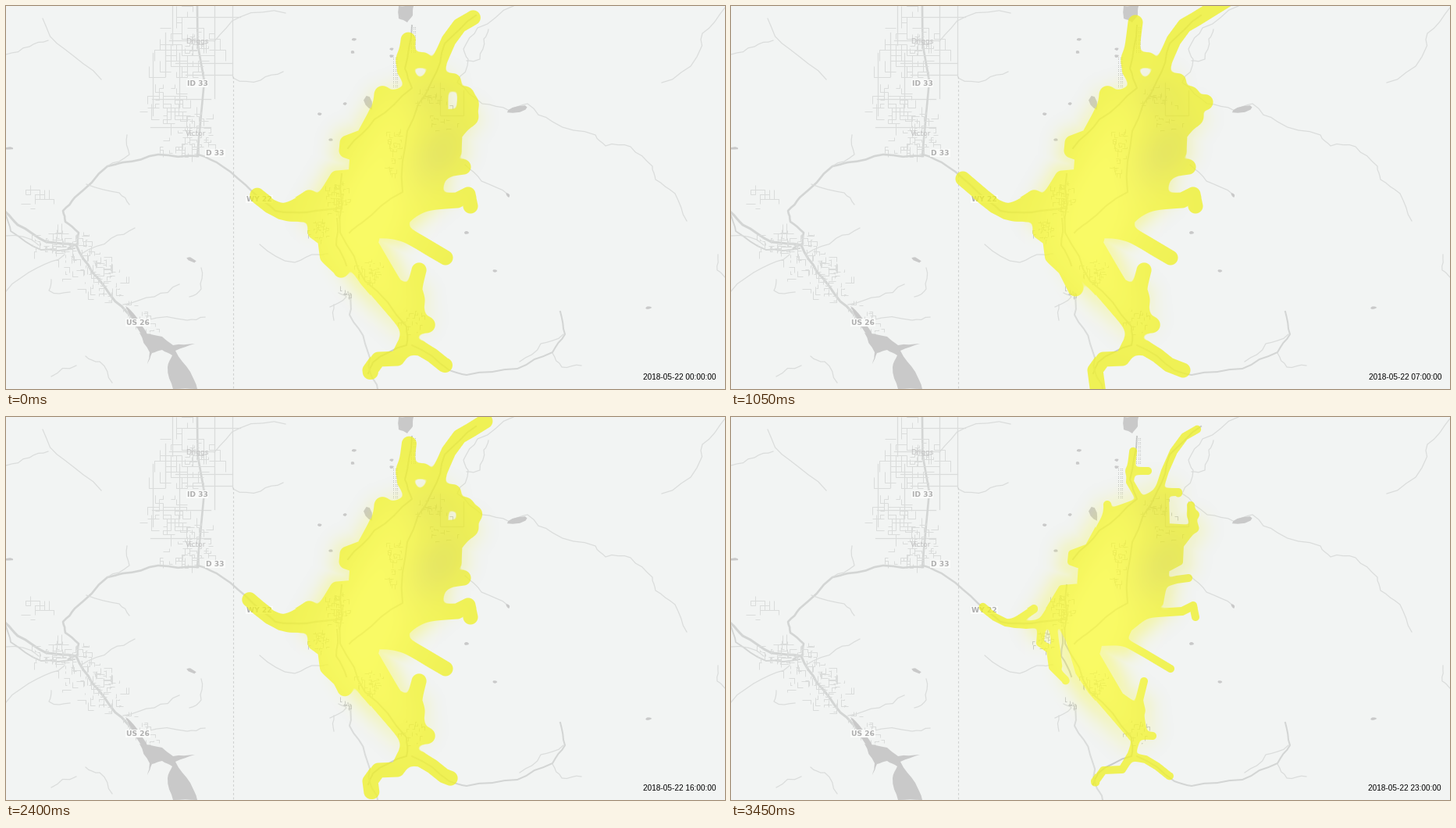
A matplotlib script for the animation above (3600 ms loop, 921 by 490 pixels).

```python
import random
import numpy as np
import matplotlib.pyplot as plt
from matplotlib.animation import FuncAnimation
from matplotlib.collections import LineCollection
from matplotlib.patches import Polygon
from matplotlib.path import Path

W, H, DPI = 921, 490, 100
PX = 72 / DPI
LAND, ROAD, MAIN, WATER = "#f2f4f3", "#dadcdb", "#d3d5d4", "#c9c9c9"

fig = plt.figure(figsize=(W / DPI, H / DPI), dpi=DPI, facecolor=LAND)
ax = fig.add_axes([0, 0, 1, 1])
ax.axis("off")
rng = random.Random(22)


# ---- base map ----
def pairs(xy):
    return np.array(xy, float).reshape(-1, 2)


def wander(points, amount, depth=2):
    """Roughen a line by shifting the middle of every segment sideways."""
    for _ in range(depth):
        out = [points[0]]
        for p, q in zip(points, points[1:]):
            side = np.array([p[1] - q[1], q[0] - p[0]])
            out += [(p + q) / 2 + side * rng.uniform(-amount, amount), q]
        points = out
    return np.array(points)


def road(*xy, w=1.2, c=ROAD, rough=0.12):
    line = wander(pairs(xy), rough)
    ax.plot(*line.T, color=c, lw=w * PX, solid_joinstyle="round", zorder=1)


def highway(*xy, w=2.6):
    road(*xy, w=w, c=MAIN, rough=0.05)


def lake(*xy, rough=0.06):
    shore = pairs(xy)
    ax.add_patch(Polygon(wander(np.vstack([shore, shore[:1]]), rough), fc=WATER, ec="none", zorder=2))


def pond(x, y, rx, ry, turn=0.0):
    t = np.arange(0, 2 * np.pi, 0.7)
    r = np.array([rng.uniform(0.7, 1.1) for _ in t])
    u, v = rx * r * np.cos(t), ry * r * np.sin(t)
    c, s = np.cos(turn), np.sin(turn)
    ax.add_patch(Polygon(np.c_[x + c * u - s * v, y + s * u + c * v], fc=WATER, ec="none", zorder=2))


def streets(cx, cy, rx, ry, n, size=10, skew=0.0, step=1, c=ROAD):
    """Scatter right-angled streets in an ellipse, snapped to a block size."""
    lines = []
    for _ in range(n):
        a, r = rng.uniform(0, 2 * np.pi), rng.random() ** 0.7
        dy = ry * r * np.sin(a)
        x, y, u, v = [step * round(k / step) + 0.5 for k in
                      (cx + rx * r * np.cos(a) + skew * dy, cy + dy,
                       rng.uniform(-size, size), rng.uniform(-size, size))]
        lines.append([(x, y), (x + u - 0.5, y), (x + u - 0.5, y + v - 0.5)])
    ax.add_collection(LineCollection(lines, colors=c, linewidths=PX, zorder=1))


def draw_northwest():
    for x, top, bottom in [(213, 0, 50), (204, 34, 90), (188, 60, 140), (222, 60, 130),
                           (267, 0, 118), (290, 0, 90)]:
        road(x, top, x, bottom, rough=0)
    for y, right in [(14, 300), (44, 267), (73, 290), (88, 290), (119, 262), (155, 262)]:
        road(right - rng.randint(55, 80), y, right, y, rough=0)
    highway(245, 0, 245, 192)
    streets(230, 55, 40, 60, 45, 22, step=7)
    streets(208, 130, 32, 30, 45, 14, step=5)
    streets(244, 48, 14, 18, 25, 8, step=3)
    streets(244, 165, 22, 28, 60, 9, step=3)
    streets(215, 182, 24, 12, 18, 9, step=4)
    road(267, 45, 300, 14, 358, 9)
    road(291, 92, 326, 95, 355, 84)
    road(47, 16, 75, 55, 122, 94)
    road(0, 62, 30, 52, 54, 44)
    highway(246, 192, 195, 190, 150, 200, 130, 205, 88, 245, 73, 262, 76, 276, 93, 290, 92, 304, 80, 310)
    road(130, 205, 158, 190, 155, 165)
    road(103, 228, 145, 239, 158, 254)
    pond(4, 182, 7, 2)


def draw_southwest():
    highway(0, 264, 15, 280, 52, 302, 90, 306, 110, 340, 140, 378, 170, 406, 180, 422, w=3)
    highway(0, 268, 6, 288, 45, 312, 88, 310, w=1.8)
    road(95, 318, 135, 297, 165, 284)
    road(0, 365, 40, 335, 75, 318)
    road(0, 294, 42, 306)
    streets(42, 246, 22, 18, 14, 14, step=6)
    streets(74, 305, 42, 20, 50, 12)
    streets(115, 345, 40, 38, 65, 11, 0.7)
    streets(172, 402, 16, 24, 24, 8, 0.6)
    road(58, 350, 55, 364, 82, 366)
    road(150, 382, 190, 372, 222, 356)
    road(180, 402, 232, 402, 255, 398)
    road(235, 372, 250, 362, 250, 335)
    road(102, 448, 120, 455, 136, 482)
    road(58, 474, 90, 460)
    lake(153, 384, 164, 394, 182, 422, 172, 418)
    lake(171, 418, 200, 423, 214, 434, 242, 432, 217, 441, 236, 468, 245, 490, 214, 490,
         207, 462, 213, 447, 200, 440, 187, 444, 181, 458, 184, 443)
    pond(238, 325, 7, 2.5, 0.5)


def draw_valley():
    highway(246, 190, 277, 205, 316, 238, 345, 262, 385, 264, 430, 258, w=2.4)
    road(325, 305, 370, 328, 400, 318, 412, 317)
    inside = "#c9cbca"
    for line in [(602, 12, 562, 48, 546, 95, 514, 160, 508, 238, 455, 278, 440, 290),
                 (520, 25, 511, 80, 520, 105, 472, 145, 438, 182),
                 (430, 215, 428, 290, 460, 352, 513, 410, 513, 434, 470, 456, 464, 470),
                 (424, 272, 423, 306, 436, 332)]:
        road(*line, w=2, c=inside, rough=0.06)
    road(556, 98, 556, 140, 586, 140, 586, 108, rough=0, c=MAIN)
    highway(520, 434, 568, 466, 590, 472, 655, 464, 700, 443, 716, 420, 710, 391, w=2)
    road(438, 366, 440, 395, 460, 432, 467, 470, 476, 490, w=2)
    road(415, 385, 436, 372, 426, 367)
    road(420, 382, 420, 402)
    road(658, 455, 685, 432, 714, 420)
    road(700, 444, 712, 462, 737, 460)
    for spot in [(424, 245, 14, 30, 60), (495, 185, 10, 32, 40), (545, 115, 28, 20, 25),
                 (465, 338, 16, 18, 40), (402, 285, 14, 16, 24), (560, 150, 26, 12, 12),
                 (520, 400, 14, 26, 20), (432, 368, 9, 5, 7)]:
        streets(*spot, size=6, c=inside)


def draw_east():
    road(650, 0, 604, 28, 586, 55, 592, 68, 578, 98, 610, 125, 645, 134, 668, 125, 700, 148,
         755, 165, 768, 179, 800, 180, 828, 205, 832, 222, 857, 240, 872, 275)
    road(590, 70, 607, 68, 612, 42, 618, 30)
    road(588, 203, 609, 224, 644, 242)
    road(840, 98, 885, 65, 892, 35, 921, 2)
    road(912, 318, 911, 338, 921, 347)
    lake(503, 0, 522, 0, 521, 12, 514, 21, 503, 16)
    pond(464, 123, 10, 5, 1.1)
    pond(655, 132, 16, 5, -0.2)
    pond(643, 242, 4, 2, 1)
    pond(823, 386, 4, 2)
    for x, y in [(444, 59), (446, 43), (402, 138), (416, 171), (434, 125), (590, 290),
                 (626, 339), (494, 55), (494, 64)]:
        pond(x, y, 3, 2)
    for x0, x1, y0, y1 in [(519, 526, 27, 60), (496, 503, 66, 105)]:
        gx, gy = np.meshgrid(np.arange(x0, x1, 2.5), np.arange(y0, y1, 2.5))
        ax.plot(gx.ravel(), gy.ravel(), "s", ms=0.9 * PX, mew=0, color="#bfc1c0", zorder=1)


draw_northwest()
draw_southwest()
draw_valley()
draw_east()
ax.plot([291, 291], [90, H], color="#cfd1d0", lw=1.1 * PX, ls=(0, (2.5, 2.5)), zorder=1)
for x, y, text in [(245, 98, "ID 33"), (268, 187, "D 33"), (324.5, 246, "WY 22"), (169, 404, "US 26")]:
    ax.text(x, y, text, family="DejaVu Sans", weight="bold", size=9.2 * PX, color="#aeaeae",
            ha="center", va="center_baseline", zorder=4,
            bbox=dict(fc="#fafbfa", ec="none", pad=0.6))
for x, y, text in [(245, 45, "Driggs"), (243, 162, "Victor")]:
    ax.text(x, y, text, family="DejaVu Sans", size=9 * PX, color="#c2c2c2",
            ha="center", va="center_baseline", zorder=4)


# ---- reachable area: valley and roads, widened by a walking distance ----
X0, X1 = 270, 660
gx, gy = np.meshgrid(np.arange(X0, X1) + 0.5, np.arange(H) + 0.5)


def distance(line):
    """Distance of every pixel to a polyline."""
    best = np.full(gx.shape, 1e6)
    for (ax_, ay), (bx, by) in zip(line, line[1:]):
        dx, dy = bx - ax_, by - ay
        t = np.clip(((gx - ax_) * dx + (gy - ay) * dy) / (dx * dx + dy * dy + 1e-9), 0, 1)
        best = np.minimum(best, np.hypot(gx - ax_ - t * dx, gy - ay - t * dy))
    return best


def blob(x, y, sx, sy, tilt=0.0):
    dx, dy = gx - x, gy - y
    return np.exp(-(((dx + tilt * dy) / sx) ** 2 + (dy / sy) ** 2))


VALLEY = pairs([524, 109, 545, 98, 555, 101, 556, 142, 590, 144, 574, 165, 573, 186, 556, 195,
                548, 238, 508, 270, 500, 287, 470, 288, 466, 304, 497, 357, 522, 375, 527, 404,
                512, 408, 462, 350, 446, 326, 434, 285, 424, 266, 398, 264, 424, 221, 448, 219,
                450, 191, 436, 186, 437, 176, 458, 168, 482, 124])
valley = distance(np.vstack([VALLEY, VALLEY[:1]]))
inner = Path(VALLEY).contains_points(np.c_[gx.ravel(), gy.ravel()]).reshape(gx.shape)
valley[inner] = 0

fixed = [valley] + [distance(pairs(xy)) for xy in [
    (510, 70, 533, 70),
    (482, 124, 481, 113),
    (588, 114, 589, 128, 593, 143),
    (548, 215, 570, 209, 585, 207),
    (530, 252, 577, 249, 591, 242, 594, 256),
    (500, 286, 530, 303, 562, 322),
    (524, 375, 522, 362, 528, 338),
    (524, 407, 539, 408),
    (412, 266, 417, 300, 419, 318),
    (364, 262, 388, 246),
]]
# Each of these roads ends in a stretch that is only reached when traffic is light.
growing = [pairs(xy) for xy in [
    (546, 98, 555, 70, 566, 45, 580, 26, 594, 18, 636, -8),
    (524, 108, 510, 84, 512, 62, 514, 46, 517, 22),
    (550, 97, 572, 97, 574, 126),
    (590, 126, 593, 126, 607, 124),
    (514, 435, 530, 438, 545, 447, 560, 459, 578, 466),
    (520, 405, 512, 432, 500, 451, 476, 452, 466, 466, 470, 496),
    (398, 266, 396, 289, 409, 298, 412, 320, 428, 336, 441, 362),
    (400, 264, 378, 266, 352, 263, 338, 256, 324, 245, 297, 222),
]]


def coverage(radius, reach):
    """Soft union of all roads, the last stretches cut at a share of their length."""
    fields = list(fixed)
    for line in growing:
        tip = line[-2] + (line[-1] - line[-2]) * reach
        fields.append(distance(np.vstack([line[:-1], tip])))
    k = 0.42 * radius
    near = -k * np.log(sum(np.exp(-np.minimum(f, 90) / k) for f in fields))
    return np.clip(radius - near + 0.5, 0, 1)


AREAS = dict(W=coverage(9.5, 0.08), M=coverage(9.5, 0.45), X=coverage(9.5, 1),
             L=coverage(5, 0.35), N=coverage(5, 0.05))
HOURS = "WNLWL" + "X" * 8 + "MWWMWWNNWNN"

light = np.minimum(1, blob(470, 265, 75, 80, 0.3) + 0.6 * blob(490, 160, 40, 75, 0.3)
                   + 0.6 * blob(485, 365, 45, 60, -0.4))
dusk = 0.8 * blob(553, 190, 36, 44, 0.3) + 0.45 * blob(545, 118, 32, 26)
halo = 0.55 * np.exp(-(np.maximum(valley - 5, 0) / 20) ** 2) * blob(475, 270, 120, 170, 0.3)

EDGE, CORE, DIM = (np.array(c) / 255 for c in [(239, 241, 40), (253, 253, 60), (222, 222, 54)])
rgba = np.empty(gx.shape + (4,))
rgba[..., :3] = EDGE + light[..., None] * (CORE - EDGE) + dusk[..., None] * (DIM - EDGE)

area = ax.imshow(rgba, extent=(X0, X1, H, 0), aspect="auto", interpolation="nearest", zorder=6)
clock = ax.text(910, 478, "", family="Liberation Sans", size=10 * PX, color="black",
                ha="right", va="baseline", zorder=9)
ax.set_xlim(0, W)
ax.set_ylim(H, 0)


def update(hour):
    rgba[..., 3] = 0.78 * (1 - (1 - AREAS[HOURS[hour]]) * (1 - halo))
    area.set_data(rgba)
    clock.set_text(f"2018-05-22 {hour:02d}:00:00")
    return area, clock


anim = FuncAnimation(fig, update, frames=24, interval=150, repeat=True, repeat_delay=0, blit=False)
plt.show()
```
